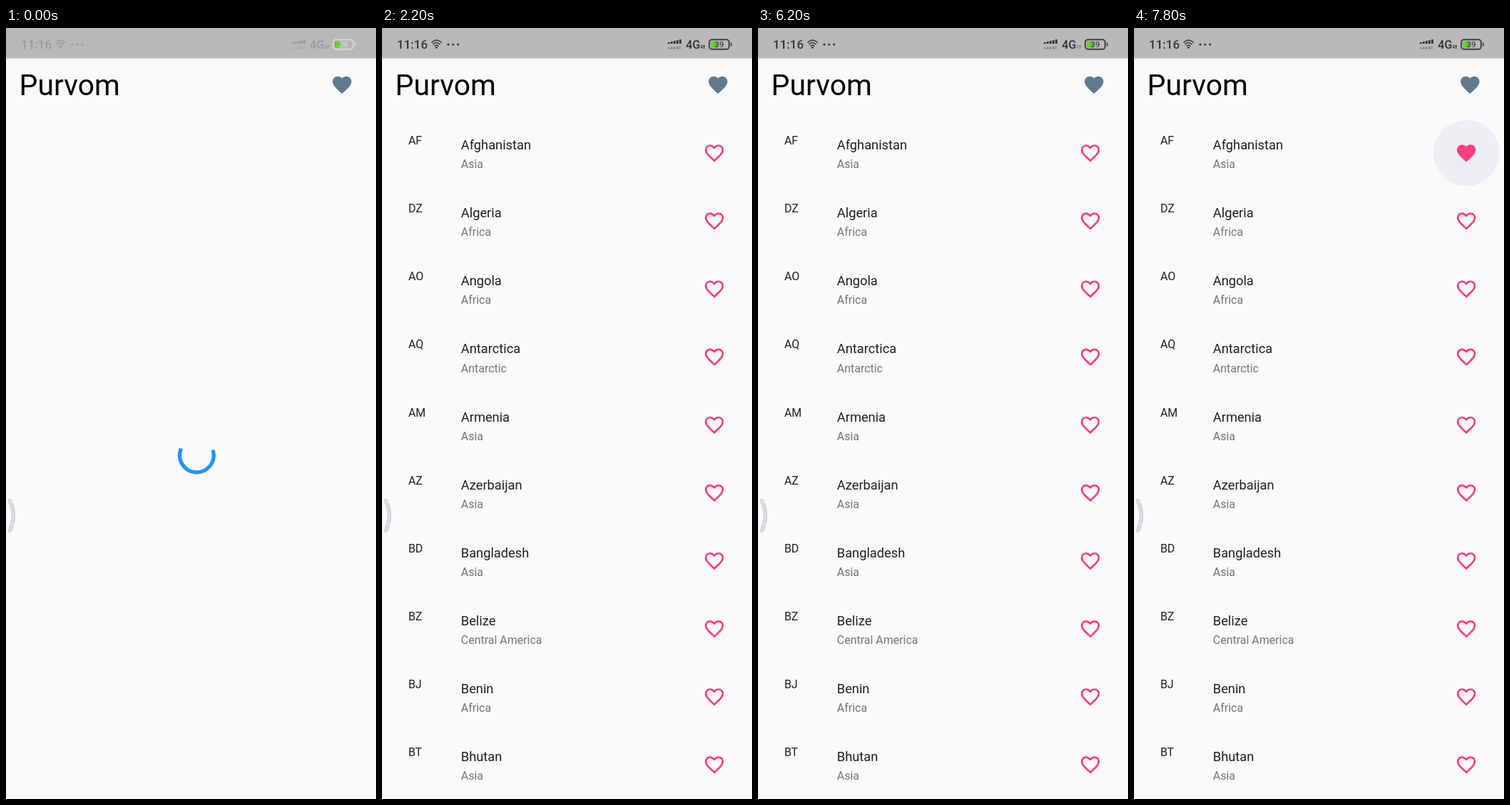
An HTML page for the animation above (8 s loop, 519 px wide and 1079 px high).

```html
<!DOCTYPE html>
<html lang="en">
<head>
<meta charset="utf-8">
<title>Country list</title>
<style>
  html, body { margin: 0; width: 100%; height: 100%; overflow: hidden; background: #fbf9fc; }
  svg { display: block; width: 519px; height: 1079px; font-family: Roboto, sans-serif; }
  .name { font-size: 18.25px; fill: #1f1e20; }
  .code { font-size: 15.96px; fill: #1f1e20; }
  .region { font-size: 15.96px; fill: #757476; }
  .tip rect { fill: #6f6d70; }
  .tip text { font-size: 15.96px; fill: #fff; text-anchor: middle; }
  .splash { fill: #c8c6c9; }
  .glow { fill: #bcbabd; }
</style>
</head>
<body>
<svg viewBox="0 0 519 1079" xmlns="http://www.w3.org/2000/svg">
  <defs>
    <path id="full" d="M12 21.35l-1.45-1.32C5.4 15.36 2 12.28 2 8.5 2 5.42 4.42 3 7.5 3c1.74 0 3.41.81 4.5 2.09C13.09 3.81 14.76 3 16.5 3 19.58 3 22 5.42 22 8.5c0 3.78-3.4 6.86-8.55 11.54L12 21.35z"/>
    <path id="hollow" d="M16.5 3c-1.74 0-3.41.81-4.5 2.09C10.91 3.81 9.24 3 7.5 3 4.42 3 2 5.42 2 8.5c0 3.78 3.4 6.86 8.55 11.54L12 21.35l1.45-1.32C18.6 15.36 22 12.28 22 8.5 22 5.42 19.58 3 16.5 3zm-4.4 15.55l-.1.1-.1-.1C7.14 14.24 4 11.39 4 8.5 4 6.5 5.5 5 7.5 5c1.54 0 3.04.99 3.57 2.36h1.87C13.46 5.99 14.96 5 16.5 5c2 0 3.5 1.5 3.5 3.5 0 2.89-3.14 5.74-7.9 10.05z"/>
    <clipPath id="bar"><rect width="519" height="117"/></clipPath>
  </defs>
  <rect width="519" height="1079" fill="#fbf9fc"/>
  <rect width="519" height="42.5" fill="#bbb8bb"/>

  <g id="status">
    <text x="21" y="29" font-size="17" font-weight="500">11:16</text>
    <g fill="none" stroke="currentColor" stroke-width="1.6">
      <path d="M69.5 20.5Q76.5 13.500 83.500 20.5M71.500 23Q76.500 18 81.500 23M73.500 25.500Q76.500 22.500 79.500 25.500"/>
    </g>
    <circle cx="76.500" cy="27.300" r="1.500"/>
    <g id="dots"></g>
    <g id="signal"></g>
    <text x="426.300" y="29" font-size="16" font-weight="500">4G</text>
    <path id="arrows" d="M448 23.500h1.100v3h1.100l-1.600 2.700-1.600-2.700h1zM451.200 29h1.100v-3h1l-1.500-2.700-1.600 2.700h1z"/>
  </g>
  <rect x="461" y="18.500" width="10.500" height="9.200" rx="1.500" fill="#65cf32"/>
  <g id="battery">
    <rect x="459" y="16.300" width="28" height="13.500" rx="4" fill="none" stroke="currentColor" stroke-width="1.900"/>
    <rect x="489" y="20.500" width="1.700" height="5" rx=".8"/>
    <text x="473" y="27.200" font-size="11.500" font-weight="500" text-anchor="middle">39</text>
  </g>

  <text x="18.600" y="94" font-size="40.900" fill="#000">Purvom</text>
  <g id="headTap" clip-path="url(#bar)">
    <circle class="glow" cx="487" cy="80" r="46.200"/>
    <circle class="splash" cx="472" cy="78"/>
  </g>
  <use href="#full" fill="#607b8b" transform="translate(455.500 63.700) scale(1.3216)"/>

  <g id="list">
    <g id="rowTap">
      <circle class="glow" cx="466.200" cy="175" r="46.200"/>
      <circle class="splash" cx="467" cy="170.500"/>
    </g>
    <g id="rows"></g>
  </g>
  <path id="arc" fill="none" stroke="#2196f3" stroke-width="5.300" stroke-linecap="square"/>
  <g fill="none" stroke-linecap="round">
    <path d="M5.500 661.500Q15 682 5.500 703.500" stroke="#cbc9cc" stroke-width="5.500"/>
    <path d="M5.500 661.500Q15 682 5.500 703.500" stroke="#dedce0" stroke-width="3.800"/>
  </g>

  <g id="headTip" class="tip">
    <rect x="307.300" y="111.300" width="198.500" height="42.300" rx="5.300"/>
    <text x="406.500" y="138">View all favorite items</text>
  </g>
  <g id="rowTip" class="tip">
    <rect x="351" y="206.600" width="154.800" height="42.300" rx="5.300"/>
    <text x="428.400" y="233.200">Add to favorites</text>
  </g>
</svg>
<script>
const LOOP = 8000, STEP = 200, LIST_AT = 2000, LIKE_AT = 7800;
const ROW = 95.13, PINK = '#f73e7f';
const $ = id => document.getElementById(id);
const clamp = v => Math.min(1, Math.max(0, v));
const ramp = (t, from, to) => clamp((t - from) / (to - from));

const countries = [
  ['AF', 'Afghanistan', 'Asia'], ['DZ', 'Algeria', 'Africa'],
  ['AO', 'Angola', 'Africa'], ['AQ', 'Antarctica', 'Antarctic'],
  ['AM', 'Armenia', 'Asia'], ['AZ', 'Azerbaijan', 'Asia'],
  ['BD', 'Bangladesh', 'Asia'], ['BZ', 'Belize', 'Central America'],
  ['BJ', 'Benin', 'Africa'], ['BT', 'Bhutan', 'Asia']
];
$('rows').innerHTML = countries.map(([code, name, region], i) => `
  <g transform="translate(0 ${(i * ROW).toFixed(2)})">
    <text class="code" x="36.900" y="163">${code}</text>
    <text class="name" x="110.800" y="170">${name}</text>
    <text class="region" x="110.800" y="196.200">${region}</text>
    <use class="heart" href="#hollow" fill="${PINK}" transform="translate(450.300 159.200) scale(1.3216)"/>
  </g>`).join('');
const firstHeart = document.querySelector('.heart');

$('dots').innerHTML = [0, 1, 2].map(i => `<circle cx="${93 + i * 6.8}" cy="23" r="1.600"/>`).join('');
$('signal').innerHTML = [0, 1, 2, 3, 4].map(i => {
  const x = 401 + i * 4, h = 2 + i;
  const low = i < 4 ? `<rect x="${x}" y="${27.5 - i * .5}" width="2.600" height="${2 + i * .5}" opacity=".4"/>` : '';
  return `<rect x="${x}" y="${22 - h}" width="2.800" height="${h}"/>${low}`;
}).join('') + '<path d="M415.500 25.500l4 4m0-4l-4 4" stroke="currentColor" opacity=".45"/>';

// cubic-bezier(.4, 0, .2, 1)
function ease(x) {
  let lo = 0, hi = 1;
  for (let i = 0; i < 24; i++) {
    const s = (lo + hi) / 2, r = 1 - s;
    if (1.2 * s * r * r + .6 * s * s * r + s ** 3 < x) lo = s; else hi = s;
  }
  return lo * lo * (3 - 2 * lo);
}

function spinner(t) {
  const clock = t * .955;
  const phase = (.25 + clock / 1333) % 1;
  const head = ease(clamp(phase * 2)), tail = ease(clamp(phase * 2 - 1));
  const start = -90 + tail * 270 + 55.5 + clock / 2222 * 360 + phase * 90;
  const sweep = Math.max((head - tail) * 270, .1);
  const point = deg => {
    const a = deg * Math.PI / 180;
    return `${(267.5 + 23.8 * Math.cos(a)).toFixed(2)} ${(598 + 23.8 * Math.sin(a)).toFixed(2)}`;
  };
  $('arc').setAttribute('d', `M${point(start)}A23.800 23.800 0 ${sweep > 180 ? 1 : 0} 1 ${point(start + sweep)}`);
}

function ripple(id, t, down, up) {
  const [glow, splash] = $(id).children;
  const alpha = .43 * ramp(t, down, down + 200) * (1 - ramp(t, up, up + 210));
  glow.setAttribute('opacity', alpha);
  splash.setAttribute('opacity', alpha);
  splash.setAttribute('r', 46.2 * ramp(t, down, down + 1000));
}

const tip = (id, t, from, to) =>
  $(id).setAttribute('opacity', t < to ? ramp(t, from, from + 150) : 0);

function tint(id, color) {
  $(id).setAttribute('fill', color);
  $(id).setAttribute('color', color);
}

function draw(t) {
  const waking = t < STEP, loaded = t >= LIST_AT, liked = t >= LIKE_AT;
  tint('status', waking ? '#9c999c' : '#343335');
  tint('battery', waking ? '#d8d6d8' : '#403f41');
  $('arrows').setAttribute('opacity', t >= 6000 && t < 7200 ? .4 : 1);

  $('list').setAttribute('visibility', loaded ? 'visible' : 'hidden');
  $('arc').setAttribute('visibility', loaded ? 'hidden' : 'visible');
  spinner(t);

  ripple('headTap', t, 3850, 4260);
  ripple('rowTap', t, 6240, 6650);
  if (liked) $('rowTap').children[0].setAttribute('opacity', .19);
  tip('headTip', t, 4250, 5600);
  tip('rowTip', t, 6640, LIKE_AT);

  firstHeart.setAttribute('href', liked ? '#full' : '#hollow');
  firstHeart.setAttribute('fill', liked ? '#ff3d7f' : PINK);
}

let origin;
function tick(now) {
  origin ??= now;
  draw(Math.floor((now - origin) % LOOP / STEP) * STEP);
  requestAnimationFrame(tick);
}
draw(0);
requestAnimationFrame(tick);
</script>
</body>
</html>
```
